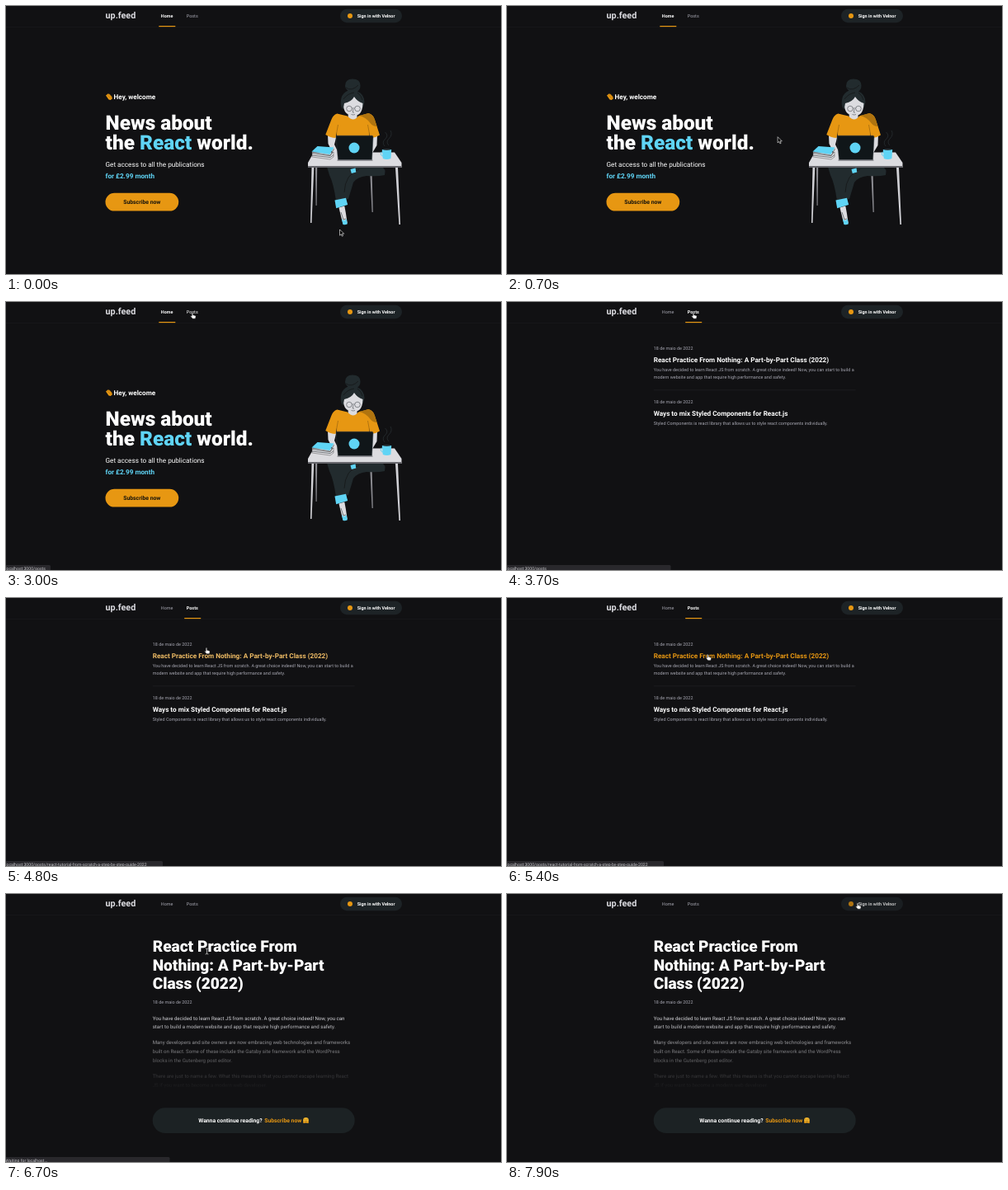
These frames come from a looping animation (600x325 px, 8000 ms). An HTML page:

```html
<!DOCTYPE html>
<html lang="en">
<head>
<meta charset="utf-8">
<title>up.feed</title>
<style>
  html, body { margin: 0; height: 100%; overflow: hidden; background: #111113; }
  svg { display: block; width: 600px; height: 325px; }
  text { font: 5.45px Roboto, sans-serif; fill: #a8a8b3; text-rendering: geometricPrecision; white-space: pre; }
  .bold { font-weight: 700; fill: #fff; }
  .logo { font-size: 10.8px; font-weight: 700; fill: #dcdce1; }
  .active { font-weight: 700; fill: #fff; }
  .hover { fill: #fff; }
  .big { font-size: 24.4px; font-weight: 900; }
  .mid { font-size: 8.18px; }
  .cta { font-size: 6.82px; }
  .title { font-size: 19.1px; font-weight: 900; }
  .body { font-size: 6.14px; fill: url(#fade); }
  .white { fill: #fff; }
  .cyan { fill: #5fd4f5; }
  .orange { fill: #e79712; }
  .light { fill: #dcdce0; }
  .dark { fill: #222b2e; }
  .line { fill: none; stroke: #30383b; stroke-width: .6; }
  #status rect { fill: #29282c; }
  #status text { font-size: 5.15px; fill: #c4c4c8; }
  #cursor path { stroke: #fff; stroke-width: .6; stroke-linejoin: round; }
</style>
</head>
<body>
<svg viewBox="0 0 600 325">
  <defs>
    <linearGradient id="fade" gradientUnits="userSpaceOnUse" x1="0" y1="145" x2="0" y2="237">
      <stop stop-color="#e1e1e6"/><stop offset="1" stop-color="#e1e1e6" stop-opacity="0"/>
    </linearGradient>
  </defs>

  <rect y="25" width="600" height="1" fill="#161619"/>
  <text class="logo" x="120.5" y="15.2">up.feed</text>
  <text id="navHome" x="187.8" y="14">Home</text>
  <text id="navPosts" x="218.8" y="14">Posts</text>
  <rect id="underline" class="orange" y="24" width="20" height="1.2"/>
  <g id="signIn">
    <rect x="405" y="3.8" width="75" height="16.4" rx="8.2" fill="#1d2326"/>
    <circle class="orange" cx="417" cy="12" r="3"/>
    <text class="bold" x="425.7" y="14">Sign in with Velnor</text>
  </g>

  <g id="home">
    <g class="orange">
      <path d="M121 108.6l1.2-1.1 1-.9 2.2.2 2.8 2.9.6 2.6-2 1.6-2.3-.4z"/>
      <path d="M122.2 107.4l4.8 4.6M124 106.6l4 3.8" stroke="#8a5508" stroke-width=".4"/>
    </g>
    <text class="bold mid" x="130.6" y="112.5">Hey, welcome</text>
    <text class="bold big" x="120.5" y="149.5">News about</text>
    <text class="bold big" x="120.5" y="174.1">the <tspan class="cyan">React</tspan> world.</text>
    <text class="mid white" x="120.5" y="195.3">Get access to all the publications</text>
    <text class="bold mid cyan" x="120.5" y="208.8">for £2.99 month</text>
    <rect class="orange" x="120.5" y="226.8" width="88.7" height="21.8" rx="10.9"/>
    <text class="bold cta" x="164.8" y="240.1" text-anchor="middle" style="fill:#16130c">Subscribe now</text>

    <!-- far table legs, then trousers and feet -->
    <path fill="#8d8d93" d="M375 196h2.2l-.6 46h-1zM441 196h2.4l1.4 54h-1.2z"/>
    <path class="dark" d="M389 195h66q6 2 4 10-8 2-22 1-11 1-16 8l-6 20-15 2q-3-21-8-31z"/>
    <path class="line" style="stroke:#111" d="M428 198q-17 6-18 28"/>
    <path class="cyan" d="M417.5 198l6-1.5.8 5-5.500 1.500z"/>
    <path class="cyan" d="M398.5 235.500l13.500-2.800 2.200 8.300-14 4.300z"/>
    <path class="light" d="M403.5 244.500l6.800-2 1.400 7.500 2 13-5 1.500-2.300-8z"/>
    <path class="line" d="M406 250l3 9 3-1"/>
    <path class="cyan" d="M406.800 258l3 2.400 2.800-2.200 1.300 6q-3 2-5.500.5z"/>

    <!-- head -->
    <path class="dark" d="M411 97q0-8.500 9-8.500 9.500 0 9.500 8 0 5-3.500 7 8 3 8.500 13l-2 7-25 1q-3-5-1-13 1.500-6 8-9-3.500-2-3.500-6.500z"/>
    <path class="line" style="stroke:#111" d="M412 99q7 5 15-3M409 113q5-7 13-8M426 105q5 4 6 9"/>
    <path class="light" d="M410 118q9-2 12-8 4 6 10.500 8l-.4 4.500q-1 8-6.600 10l.2 5q-6 4-11 0v-6q-5-3-5.500-9z"/>
    <g class="line" style="stroke:#4a5054">
      <circle cx="416" cy="124.500" r="3.300"/><circle cx="426" cy="124.500" r="3.300"/>
      <path d="M419.300 124h3.400M421 125l-.8 4 1.800.2M418.500 131.500q2.500 1 4.500 0"/>
    </g>

    <!-- shirt and arms -->
    <path class="light" d="M390 156l10.500 2-2.500 10 6 12h-7l-6.500-13zM440 158l10-2-.5 13-6.500 11h-5l5-12z"/>
    <path class="orange" d="M414 133.500q7 8 13 0l12.500-3.500q6 2 7.500 8l6 18.500q-6 4-12 3.500l-1-7v10h-39v-10l-1.500 7q-6 0-12.200-4l7-18q2-6 7-7.500z"/>
    <path fill="#b0740f" d="M428 133l11.500-3q6 2 7.500 8l2.500 8q-5 0-8-4-5-7-13.500-9z"/>
    <path class="line" style="stroke:#8d5d10" d="M400.500 155l2-11M440.500 155l-2-11"/>

    <!-- table, books, cup, laptop -->
    <path class="light" d="M373 177.500h98l8.500 12.500v6H366v-6z"/>
    <path fill="#68686e" d="M366 194h113.500v2H366z"/>
    <path fill="#d2d2d7" d="M370.500 196h2.800l-2.800 67h-1.500zM472 196h3l3 69h-1.600z"/>
    <path class="light" stroke="#333" stroke-width=".4" d="M371 177l22 4 4-4v6l-4 3-22-3z"/>
    <path class="cyan" d="M370.500 176.500l7-6.500 20 1.500-5 8.500z"/>
    <path class="line" d="M371 178.500l22 3.200 4.500-8.500M371 181l22 2.600 4-3"/>
    <path class="cyan" d="M455.800 174h11.400l-.8 11q-4.700 2-9.600 0z"/>
    <path fill="#27343a" d="M455.800 174q5.700-2 11.400 0-5.700 2-11.400 0z"/>
    <path fill="none" stroke="#5fd4f5" d="M457 177q-3.500 0-2.500 3 .6 2.500 3 2"/>
    <path class="line" d="M459 170q-4-5 1-9 4-4-.5-8M464 169q-4-4 0-8 5-5 2-10"/>
    <path fill="#101619" stroke="#343c40" stroke-width=".5" d="M401 157.200h42.500q1.500 0 1.500 1.500l-1.500 28h-41l-2.500-28q-.2-1.500 1-1.500z"/>
    <path fill="#85858b" d="M401.500 186.500h43v1.200h-43z"/>
    <circle class="cyan" cx="422" cy="172" r="6.500"/>
  </g>

  <g id="posts">
    <text x="177.700" y="58">18 de maio de 2022</text>
    <text id="firstPost" class="bold mid" x="177.700" y="73">React Practice From Nothing: A Part-by-Part Class (2022)</text>
    <text x="177.700" y="84.400">You have decided to learn React JS from scratch. A great choice indeed! Now, you can start to build a</text>
    <text x="177.700" y="93.200">modern website and app that require high performance and safety.</text>
    <rect x="177.700" y="106.500" width="245" height=".7" fill="#202024"/>
    <text x="177.700" y="123.200">18 de maio de 2022</text>
    <text class="bold mid" x="177.700" y="138">Ways to mix Styled Components for React.js</text>
    <text x="177.700" y="149.300">Styled Components is react library that allows us to style react components individually.</text>
  </g>

  <g id="article">
    <text class="bold title" x="177.700" y="70.400">React Practice From</text>
    <text class="bold title" x="177.700" y="92.800">Nothing: A Part-by-Part</text>
    <text class="bold title" x="177.700" y="115.200">Class (2022)</text>
    <text x="177.700" y="133">18 de maio de 2022</text>
    <text class="body" x="177.700" y="152.500">You have decided to learn React JS from scratch. A great choice indeed! Now, you can</text>
    <text class="body" x="177.700" y="163.400">start to build a modern website and app that require high performance and safety.</text>
    <text class="body" x="177.700" y="182.400">Many developers and site owners are now embracing web technologies and frameworks</text>
    <text class="body" x="177.700" y="193.300">built on React. Some of these include the Gatsby site framework and the WordPress</text>
    <text class="body" x="177.700" y="204.200">blocks in the Gutenberg post editor.</text>
    <text class="body" x="177.700" y="223.200">There are just to name a few. What this means is that you cannot escape learning React</text>
    <text class="body" x="177.700" y="234.100">JS if you want to become a modern web developer.</text>
    <rect x="177.700" y="259.300" width="245" height="30.600" rx="15.300" fill="#1c2224"/>
    <text class="bold cta" x="233.300" y="276.900">Wanna continue reading?</text>
    <text class="bold cta orange" x="313.200" y="276.900">Subscribe now</text>
    <circle cx="363.500" cy="274.300" r="3.300" fill="#f5b92e"/>
    <path d="M361.800 273.300h1M364.200 273.300h1M362 275.200q1.500 1.300 3 0" fill="none" stroke="#6b3d08" stroke-width=".6"/>
    <path d="M360.200 275.500l2.800 1.200-.8 1.400-2-.4zM366.800 275.500l-2.800 1.200.8 1.400 2-.4z" class="orange"/>
  </g>

  <g id="status">
    <rect x="-3" y="319" height="9" rx="1.500"/>
    <text x="-.8" y="325"></text>
  </g>

  <g id="cursor">
    <path id="arrow" d="M0 0V7.200L1.700 5.700 2.800 8.200 4 7.700 2.900 5.200H5.200Z"/>
    <path id="hand" fill="#fff" style="stroke:#111;stroke-width:.5" d="M-.8.300q.8-.9 1.500 0V2.800l2.600.6q1 .3.800 1.500L3.500 7.200H.2L-2.400 4.300q.1-1 1.600-.1Z"/>
    <path id="beam" fill="none" d="M-1.800-3.500Q0-3.500 0-2.500 0-3.500 1.800-3.500M0-2.500V2.500M-1.800 3.500Q0 3.500 0 2.500 0 3.500 1.800 3.500"/>
  </g>
</svg>
<script>
const LOOP = 8000, STEP = 100;
const $ = id => document.getElementById(id);
const show = (id, on) => $(id).setAttribute('display', on ? 'inline' : 'none');
const clamp = v => Math.min(1, Math.max(0, v));
const ease = v => v * v * (3 - 2 * v);
const mix = (a, b, p) => `rgb(${a.map((v, i) => Math.round(v + (b[i] - v) * p))})`;

// Each list entry starts at its time and holds until the next one.
const PAGES = [[0, 'home'], [3600, 'posts'], [6500, 'article']];
const CURSORS = [[0, 'arrow'], [2700, 'hand'], [4200, 'arrow'], [4700, 'hand'],
  [6000, 'beam'], [6900, 'arrow'], [7500, 'hand']];
const POSTS_URL = 'localhost:3000/posts';
const STATUS = [[0, '', 0], [2800, POSTS_URL, 54], [3600, POSTS_URL, 198.5], [4300, '', 0],
  [4800, POSTS_URL + '/react-tutorial-from-scratch-a-step-by-step-guide-2022', 190],
  [5900, 'Waiting for localhost...', 198.5], [6800, '', 0]];
const MOVES = [[200, 404.5, 271], [1300, 227.7, 11], [2500, 227.7, 11], [2700, 226, 13],
  [4100, 226, 13], [4700, 243, 60.5], [5000, 243, 60.5], [5500, 243.5, 69.5],
  [6800, 243.5, 69.5], [7500, 425, 11]];

const at = (list, t) => list.findLast(entry => entry[0] <= t);

function position(t) {
  const next = MOVES.findIndex(m => m[0] > t);
  if (next < 1) return (next ? MOVES.at(-1) : MOVES[0]).slice(1);
  const [a, b] = [MOVES[next - 1], MOVES[next]];
  const p = ease((t - a[0]) / (b[0] - a[0]));
  return [a[1] + (b[1] - a[1]) * p, a[2] + (b[2] - a[2]) * p];
}

function draw(t) {
  const page = at(PAGES, t)[1], cursor = at(CURSORS, t)[1], [, label, width] = at(STATUS, t);
  for (const [, id] of PAGES) show(id, id === page);
  for (const id of ['arrow', 'hand', 'beam']) show(id, id === cursor);

  const hover = t >= 2700 && t < 3600;
  $('navHome').setAttribute('class', page === 'home' ? 'active' : '');
  $('navPosts').setAttribute('class', page === 'posts' ? 'active' : hover ? 'hover' : '');
  show('underline', page !== 'article');
  $('underline').setAttribute('x', page === 'home' ? 185.3 : 216.2);

  $('firstPost').style.fill = mix([255, 255, 255], [231, 151, 18], ease(clamp((t - 4650) / 250)));
  $('signIn').style.opacity = 1 - .25 * clamp((t - 7500) / 200);

  show('status', width > 0);
  $('status').children[0].setAttribute('width', width + 3);
  $('status').children[1].textContent = label;
  $('cursor').setAttribute('transform', `translate(${position(t)})`);
}

function tick() {
  draw(Math.floor(performance.now() % LOOP / STEP) * STEP);
  requestAnimationFrame(tick);
}
tick();
</script>
</body>
</html>
```
